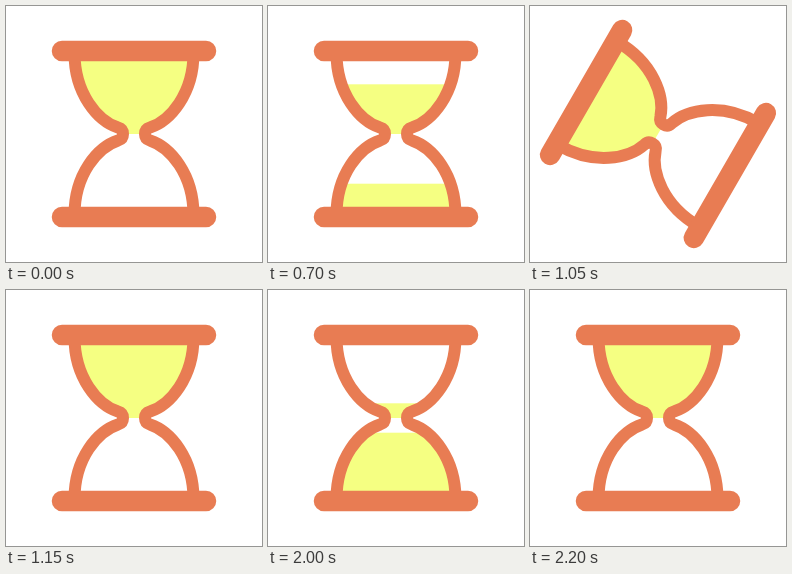
An HTML page with a canvas that plays this animation: 256 by 256 pixels, repeating every 2.25 s.

```html
<!DOCTYPE html>
<html>
<head>
<meta charset="utf-8">
<title>Hourglass</title>
<style>
  html, body { margin: 0; width: 100%; height: 100%; overflow: hidden; background: #fff; }
  canvas { display: block; }
</style>
</head>
<body>
<canvas width="256" height="256"></canvas>
<script>
const ctx = document.querySelector('canvas').getContext('2d');
const FRAME = '#e87c53', SAND = '#f5ff82';
const LOOP = 2250, STEP = 50, TURN = 22.5, LAST = 44;

// The right wall is the left wall turned by half a circle.
const wall = '68.5 47 C68.5 88 92 115 112 121.5 Q117 123 117 128 Q117 133 112 134.5 C92 141 68.5 168 68.5 209';
const glass = new Path2D(`M${wall} L${wall.replace(/[\d.]+/g, n => 256 - n)} Z`);
const bars = new Path2D('M56 45H200M56 211H200');

function stroke(path, width) {
  ctx.lineWidth = width;
  ctx.stroke(path);
}

function draw(ms) {
  const step = Math.floor(ms % LOOP / STEP);
  const beat = step < LAST ? step % TURN : 0;
  const s = Math.max(0, beat - 10.5);
  const turning = beat > 18;
  const level = turning ? 128 : Math.min(128, 54.3 + 5.286 * s + 0.449 * s * s);

  ctx.setTransform(1, 0, 0, 1, 0, 0);
  ctx.fillStyle = '#fff';
  ctx.fillRect(0, 0, 256, 256);

  ctx.translate(128, 128);
  if (turning) ctx.rotate((beat - 18) * 40 * Math.PI / 180);
  ctx.translate(-128, -128);

  ctx.save();
  ctx.clip(glass);
  ctx.fillStyle = SAND;
  ctx.fillRect(0, level, 256, 128 - level);
  ctx.fillRect(0, 256 - level, 256, level);
  ctx.restore();

  ctx.strokeStyle = FRAME;
  ctx.lineCap = 'round';
  stroke(glass, 12);
  stroke(bars, 20.5);
}

function tick() {
  draw(performance.now());
  requestAnimationFrame(tick);
}
tick();
</script>
</body>
</html>
```
